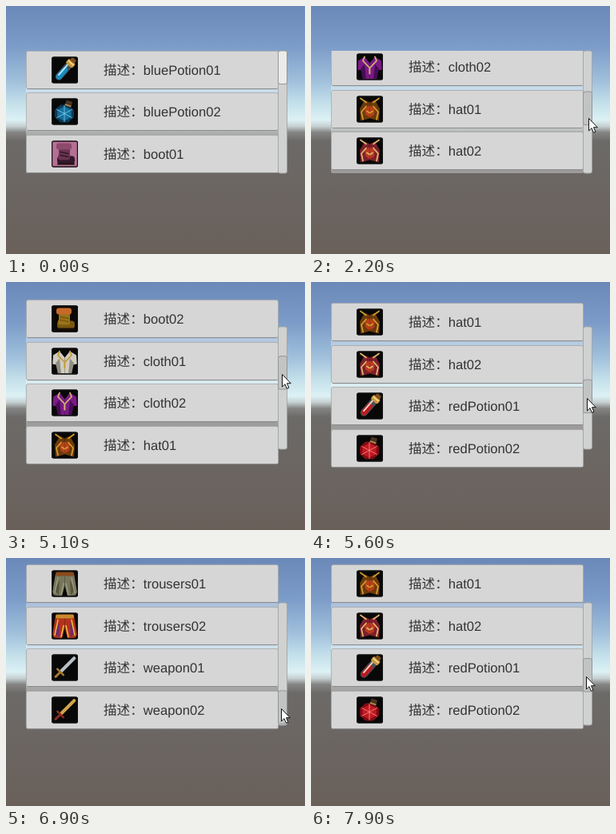
Write an HTML page that moves like this. It is 374 px wide and 310 px high and loops after 8000 ms.

```html
<!DOCTYPE html>
<html lang="zh-CN">
<head>
<meta charset="utf-8">
<title>Scroll list</title>
<style>
  html, body { margin: 0; width: 100%; height: 100%; overflow: hidden; background: #69615b; }
  svg { display: block; }
  text {
    font: 16.6px "Liberation Sans", "Noto Sans CJK SC", "Noto Sans CJK", sans-serif;
    fill: #333; text-rendering: geometricPrecision;
  }
</style>
</head>
<body>
<svg width="374" height="310" viewBox="0 0 374 310">
  <defs>
    <linearGradient id="sky" x1="0" y1="0" x2="0" y2="1">
      <stop offset="0" stop-color="#6b89b8"/>
      <stop offset=".16" stop-color="#7b9bc8"/>
      <stop offset=".3" stop-color="#9fbfdb"/>
      <stop offset=".39" stop-color="#c3dfea"/>
      <stop offset=".46" stop-color="#dcf1f4"/>
      <stop offset=".485" stop-color="#c6d0d1"/>
      <stop offset=".51" stop-color="#848484"/>
      <stop offset=".545" stop-color="#6c6a68"/>
      <stop offset="1" stop-color="#6a605a"/>
    </linearGradient>
    <clipPath id="view"><rect x="25" y="56" width="316" height="153"/></clipPath>
  </defs>
  <rect width="374" height="310" fill="url(#sky)"/>
  <rect x="25" y="56" width="316" height="153" rx="2" fill="#fff" opacity=".34"/>
  <g id="list"></g>
  <rect x="340.5" y="56" width="11" height="153" rx="2.5" fill="#d0d1d1" stroke="#a3a5a6" stroke-width=".9"/>
  <rect id="handle" x="340.5" width="11" height="41.5" rx="2.5" stroke="#8f9192" stroke-width=".9"/>
  <path id="cursor" d="M.5.5V16L4 12.7 6.4 18.3 8.9 17.2 6.5 11.7H11.3Z" fill="#fff" stroke="#111"/>
</svg>
<script>
const TOP = 56, PITCH = 52.6, ROW_H = 48, SHOWN = 4;
const VIEW_H = 153, TRAVEL = 111, LOOP = 8000, STEP = 100;

// Icons live in a 33 x 33 box; symmetric ones are a mirrored left half.
const bar = (x, y, w, h, fill, rx = 0) =>
  `<rect x="${x}" y="${y}" width="${w}" height="${h}" rx="${rx}" fill="${fill}"/>`;
const shape = (d, fill) => `<path d="${d}" fill="${fill}"/>`;
const line = (d, color, width = 1.4) =>
  `<path d="${d}" fill="none" stroke="${color}" stroke-width="${width}" stroke-linecap="round"/>`;
const turn = (angle, art) => `<g transform="rotate(${angle} 16.5 16.5)">${art}</g>`;
const mirror = half => half + `<g transform="translate(33) scale(-1 1)">${half}</g>`;
const corners = (r, n) => Array.from({ length: n }, (_, i) => {
  const a = (i + .5) / n * Math.PI * 2;
  return [16 + r * Math.cos(a), 19 + r * .92 * Math.sin(a)].map(v => v.toFixed(1)).join(' ');
});

const vial = (color, light) => turn(41,
  bar(12, 6, 9, 26, '#46525a', 4.5) + bar(13, 13, 7, 18, color, 3.5) +
  bar(14, 8, 1.8, 19, light, .9) + bar(11, 2, 11, 7, '#c9973f', 2) +
  bar(13, -2, 7, 5, '#7d5020', 1.5) + bar(12, 4, 9, 1.6, '#f7dc96'));

const flask = (dark, color, light) =>
  shape(`M${corners(13, 8).join('L')}Z`, dark) + shape(`M${corners(10, 6).join('L')}Z`, color) +
  line(corners(11, 6).map(p => `M16 19L${p}`).join(''), light, .8) +
  turn(18, bar(14, 2, 8, 7, '#4a3424', 1) + bar(14, 7, 8, 1.6, '#bf9150'));

const boot = (body, shade, cuff, back) =>
  bar(0, 0, 33, 33, back, 2) + bar(9, 7, 14, 21, body, 3) + bar(7, 19, 22, 10, shade, 4) +
  bar(8, 17, 15, 7, body, 3) + bar(6, 3, 19, 8, cuff, 3) +
  bar(7, 28, 22, 2, '#1c110a', 1) + line('M11 14L21 16M11 18L21 20', shade);

const shirt = (body, shade, trim) => mirror(
  shape('M16.5 12L10 4 2 9 1 20 7 21 8 32H16.5Z', body) +
  shape('M5 19L10 13 12 32H8Z', shade) + line('M10 4L8 9 16.5 18V25', trim, 1.8));

const trousers = (body, shade, belt, trim) => mirror(
  shape('M16.5 4H5L1 27 3 31 13 32 16.5 19Z', body) + shape('M4 25L10 12 9 31Z', shade) +
  line('M8 9L4 28M15 16L12 30', trim)) + bar(5, 2, 23, 5, belt, 2);

const helm = (body, horn, face) => mirror(
  shape('M16.5 8L10 5 4 16 5 31 16.5 28Z', body) + shape('M16.5 12L10 15 11 23 16.5 27Z', face) +
  line('M12 8L5 3M12 13L6 20 8 29M13 19L16 21', horn, 1.8));

const sword = (blade, hilt) => turn(45,
  bar(14.5, -2, 4, 26, blade, 1.5) + bar(10, 23, 13, 2.5, hilt, 1) + bar(15, 25, 3, 9, hilt, 1));

const ITEMS = Object.entries({
  bluePotion01: vial('#178cc0', '#b9efff'),
  bluePotion02: flask('#0b3a58', '#176f9c', '#7ed3f2'),
  boot01: boot('#6b3450', '#33182a', '#8c4a6c', '#b56f95'),
  boot02: boot('#9a741a', '#7a5810', '#c8692a', '#0b0805'),
  cloth01: shirt('#cfccc0', '#8f8d84', '#c79a34'),
  cloth02: shirt('#7a1a86', '#470d55', '#d0b070'),
  hat01: helm('#6b3a0c', '#d39a2c', '#b8401a'),
  hat02: helm('#7c1f2c', '#e0b468', '#b83a24'),
  redPotion01: vial('#b81c20', '#ffd0c4'),
  redPotion02: flask('#7c0d14', '#c01a24', '#ff8d88'),
  trousers01: trousers('#77765c', '#56553f', '#8a4a1c', '#9b9a7d'),
  trousers02: trousers('#b3321c', '#6b2a78', '#c98a2c', '#f0c445'),
  weapon01: sword('#b9c0c6', '#a8792c'),
  weapon02: sword('#d2a44a', '#8b2d20'),
});
const MAX_SCROLL = ITEMS.length * PITCH - (PITCH - ROW_H) - VIEW_H;

const list = document.getElementById('list');
const handle = document.getElementById('handle');
const cursor = document.getElementById('cursor');

list.innerHTML = ITEMS.map(([name, icon]) => `<g>
  <rect x="25.4" y=".4" width="315.2" height="47.2" rx="2.5" fill="#d6d6d6" stroke="#a2a4a5" stroke-width=".8"/>
  <path d="M27 47.6H339" stroke="#848687" stroke-width=".9"/>
  <g transform="translate(57 7.5)">${bar(0, 0, 33, 33, '#080808', 2.5)}${icon}
  <rect x=".6" y=".6" width="31.8" height="31.8" rx="2" fill="none" stroke="#111" stroke-width="1.2"/></g>
  <text x="122" y="30.3">描述：${name}</text></g>`).join('');
const rows = [...list.children];

// Straight lines through [time, value] points, held at both ends.
function ramp(t, points) {
  const i = points.findIndex(p => p[0] > t);
  if (i < 0) return points[points.length - 1][1];
  if (i === 0) return points[0][1];
  const [t0, v0] = points[i - 1], [t1, v1] = points[i];
  return v0 + (v1 - v0) * (t - t0) / (t1 - t0);
}

// How far the mouse has dragged the handle, in px; it may pull past the end.
const firstPull = t => ramp(t, [[600, 0], [1500, 115], [1700, 115], [2600, 0]]);
const secondPull = t => ramp(t, [
  [4500, 0], [5100, 36.7], [6300, 107.4], [6500, 115], [6800, 115], [7400, 84.6], [7900, 69.6],
]);

function cursorAt(t, pull) {
  if (t >= 100 && t < 2600) return [ramp(t, [[100, 366], [400, 348]]) - pull / 40, 89 + pull];
  if (t >= 4000) {
    return [ramp(t, [[4000, 364], [4200, 345], [7400, 344]]),
      78.5 + pull + ramp(t, [[4000, 16], [4200, 0]])];
  }
  return null;
}

function draw(t) {
  const pull = t < 3600 ? firstPull(t) : secondPull(t);
  const offset = Math.min(pull, TRAVEL);
  const scroll = offset / TRAVEL * MAX_SCROLL;
  const first = Math.min(Math.floor(scroll / PITCH), ITEMS.length - SHOWN);
  rows.forEach((row, i) => {
    row.style.display = i >= first && i < first + SHOWN ? '' : 'none';
    row.setAttribute('transform', `translate(0 ${Math.floor(TOP + i * PITCH - scroll)})`);
  });
  if (t < 3600) list.setAttribute('clip-path', 'url(#view)');
  else list.removeAttribute('clip-path');

  const pressed = (t >= 700 && t <= 2600) || t >= 4600;
  handle.setAttribute('fill', pressed ? '#c2c4c4' : '#ebebeb');
  handle.setAttribute('y', TOP + offset);

  const tip = cursorAt(t, pull);
  cursor.style.display = tip ? '' : 'none';
  if (tip) cursor.setAttribute('transform', `translate(${tip.map(Math.round).join(' ')})`);
}

const start = performance.now();
function tick() {
  const t = (performance.now() - start) % LOOP;
  draw(Math.floor(t / STEP) * STEP);
  requestAnimationFrame(tick);
}
tick();
</script>
</body>
</html>
```
